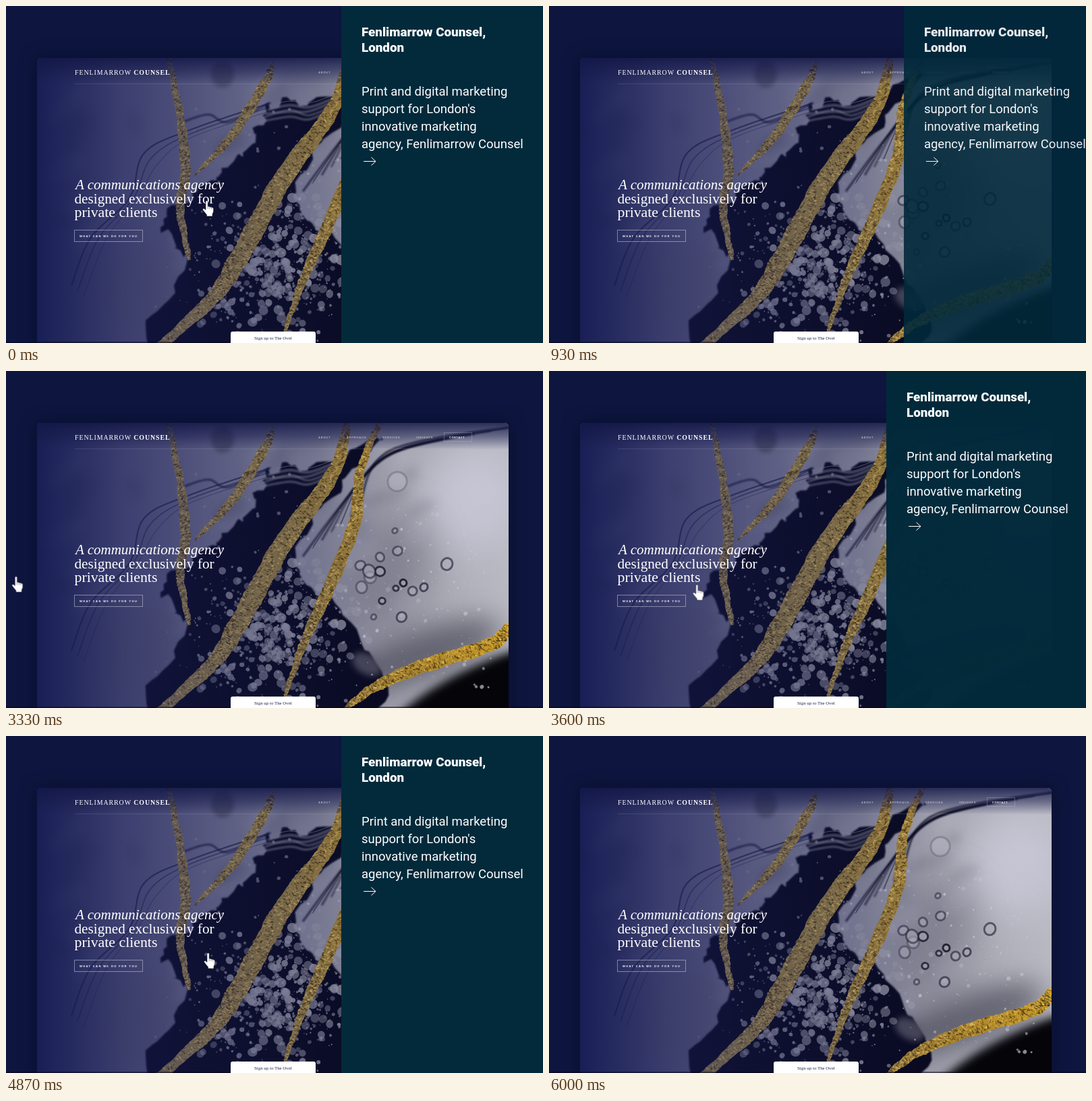
Write an HTML page with a canvas that moves like this. It is 796 px wide and 500 px high and loops after 8000 ms.

```html
<!DOCTYPE html>
<html lang="en">
<head>
<meta charset="utf-8">
<title>Agency showcase</title>
<style>
  html, body { margin: 0; width: 100%; height: 100%; overflow: hidden; background: #0e163f; }
  canvas, svg { position: absolute; left: 0; top: 0; width: 796px; height: 500px; }
  .serif { font-family: "Liberation Serif", Times, serif; fill: #fff; }
  .tiny { font: bold 4px "Liberation Sans", Arial, sans-serif; letter-spacing: .8px; fill: #fff; }
  .copy { font: 18.5px Roboto, sans-serif; fill: #fff; }
  .name { font: 800 18.8px Roboto, sans-serif; fill: #fff; }
  #panel { animation: panel 8s infinite paused; }
  #hand { animation: hand 8s infinite paused linear; }
  @keyframes panel {
    0%, 11.48% { transform: none; opacity: 1; }
    13.325%, 41.7% { transform: translateX(299px); opacity: 0; }
    45.5%, 71.64% { transform: none; opacity: 1; }
    74.98%, 100% { transform: translateX(299px); opacity: 0; }
  }
  @keyframes hand {
    0%, .83% { transform: translate(291px, 288px); animation-timing-function: ease-in; }
    10% { transform: translate(89px, 306px); }
    10.8%, 40.9% { transform: translate(-40px, 308px); }
    41.66% { transform: translate(8px, 304px); animation-timing-function: cubic-bezier(.3, .3, .5, 1); }
    48.33%, 59.9% { transform: translate(295px, 321px); }
    60.83%, 64.2% { transform: translate(293px, 321px); animation-timing-function: ease-in; }
    71.5%, 100% { transform: translate(810px, 345px); }
  }
</style>
</head>
<body>
<canvas id="art" width="796" height="500"></canvas>
<svg viewBox="0 0 796 500">
  <text class="serif" x="102" y="101.5" font-size="9.9" letter-spacing=".95">FENLIMARROW <tspan font-weight="bold">COUNSEL</tspan></text>
  <g class="tiny">
    <g opacity=".55">
      <text x="463" y="99.5">ABOUT</text>
      <text x="505" y="99.5">APPROACH</text>
      <text x="558" y="99.5">SERVICES</text>
      <text x="608" y="99.5">INSIGHTS</text>
    </g>
    <text x="657" y="99.5" style="letter-spacing:.55px">CONTACT</text>
    <text x="109" y="342.5" style="letter-spacing:1.4px">WHAT CAN WE DO FOR YOU</text>
  </g>
  <g fill="none" stroke="#c8c8d8">
    <path d="M102 115.5H690" opacity=".15"/>
    <rect x="649.5" y="91.5" width="41" height="13" opacity=".3"/>
    <rect x="101.5" y="332.5" width="101" height="17" opacity=".55"/>
  </g>
  <g class="serif" font-size="21.2">
    <text x="103" y="271.5" font-size="21" font-style="italic">A communications agency</text>
    <text x="101.5" y="292.5">designed exclusively for</text>
    <text x="101.5" y="312.5" font-size="21.8">private clients</text>
  </g>
  <rect x="333" y="483" width="126" height="30" rx="3" fill="#fff"/>
  <text class="serif" x="368" y="495" font-size="6.9" style="fill:#1a1f4d">Sign up to The Ovel</text>
  <g id="panel">
    <rect x="497" width="299" height="500" fill="#022a3b"/>
    <g class="name">
      <text x="527" y="45">Fenlimarrow Counsel,</text>
      <text x="527" y="68">London</text>
    </g>
    <g class="copy">
      <text x="527" y="133">Print and digital marketing</text>
      <text x="527" y="159">support for London's</text>
      <text x="527" y="185">innovative marketing</text>
      <text x="527" y="211">agency, Fenlimarrow Counsel</text>
    </g>
    <path d="M530 230.5H548M541.5 224.5L548 230.5L541.5 236.5" fill="none" stroke="#fff"/>
  </g>
  <g id="hand">
    <path d="M5 2C5 .6 8.2 .6 8.2 2V9L14.6 10.8C16.2 11.3 16.6 12 16.6 13.4V17L15 21V24H6.5V21.8L1 15C0 13.2 1.6 11.6 3 12.8L5 14.5Z"
      fill="#fff" stroke="#1b1b2c" stroke-width=".6"/>
    <path d="M8.2 9V13M11 10V13.4M13.8 10.8V13.8" stroke="#55556a" stroke-width=".6"/>
  </g>
</svg>
<script>
const ctx = document.getElementById('art').getContext('2d');
const X = 46, Y = 77, W = 699, H = 423;

let seed = 77;
function rnd() {
  seed = seed + 0x6D2B79F5 | 0;
  let t = Math.imul(seed ^ seed >>> 15, 1 | seed);
  t = t + Math.imul(t ^ t >>> 7, 61 | t) ^ t;
  return ((t ^ t >>> 14) >>> 0) / 4294967296;
}
const spread = a => (rnd() - .5) * 2 * a;
const gauss = () => rnd() + rnd() + rnd() - 1.5;
const grey = (v, a) => `rgba(${v},${v},${v + 16},${a})`;

// Catmull-Rom curve through a few points
function curve(pts, steps, closed) {
  const n = pts.length, out = [];
  const at = i => pts[closed ? (i + n) % n : Math.max(0, Math.min(n - 1, i))];
  for (let i = 0; i < (closed ? n : n - 1); i++) {
    for (let s = 0; s < steps; s++) {
      const u = s / steps;
      out.push([0, 1].map(k => {
        const [a, b, c, d] = [-1, 0, 1, 2].map(o => at(i + o)[k]);
        return b + .5 * u * (c - a + u * (2 * a - 5 * b + 4 * c - d + u * (3 * (b - c) + d - a)));
      }));
    }
  }
  return out;
}

function trace(pts) {
  ctx.beginPath();
  pts.forEach(p => ctx.lineTo(...p));
}

// Even colour stops along a line
function ramp(x0, y0, x1, y1, ...colors) {
  const g = ctx.createLinearGradient(x0, y0, x1, y1);
  colors.forEach((c, i) => g.addColorStop(i / (colors.length - 1), c));
  return g;
}

function soften(px, draw) {
  ctx.filter = `blur(${px}px)`;
  draw();
  ctx.filter = 'none';
}

function oval(x, y, rx, ry, turn, color) {
  ctx.fillStyle = color;
  ctx.beginPath();
  ctx.ellipse(x, y, rx, ry, turn, 0, 7);
  ctx.fill();
}

const cloud = (x, y, rx, ry, turn, color, blur) => soften(blur, () => oval(x, y, rx, ry, turn, color));
const bubble = (x, y, r, color) => oval(x, y, r, r * (.85 + rnd() * .3), rnd() * 3, color);

function strand(pts, width, color) {
  soften(width / 3, () => {
    trace(curve(pts, 14));
    ctx.strokeStyle = color;
    ctx.lineWidth = width;
    ctx.stroke();
  });
}

function paper() {
  ctx.fillStyle = ramp(X, 0, X + W, 0, '#53557c', '#62638a', '#777895', '#85869a', '#a8a8b3', '#b9b9c2');
  ctx.fillRect(X, Y, W, H);
  cloud(200, 420, 70, 80, .3, grey(88, .3), 25);
  cloud(690, 190, 75, 80, .2, grey(208, .65), 30);
  cloud(570, 300, 55, 90, .3, grey(105, .55), 28);
  cloud(620, 420, 120, 35, -.35, grey(66, .7), 20);
  for (let i = 0; i < 45; i++) {
    const v = rnd() < .5 ? 55 : 190;
    cloud(X + rnd() * W, 110 + rnd() * 290, 12 + rnd() * 30, 6 + rnd() * 14, -1 + rnd(), grey(v, .12), 7);
  }
  cloud(725, 492, 190, 62, -.42, '#040409', 7);
  cloud(321, 101, 17, 20, 0, grey(52, .5), 3);
}

function ink() {
  const edge = curve([[394, 146], [470, 140], [553, 98], [500, 165], [428, 285], [510, 370], [545, 510],
    [218, 510], [266, 385], [232, 322], [300, 262], [362, 205]], 14, true);
  const rough = edge.map(([x, y], i) => [x + 4 * Math.sin(i * .9) + spread(4), y + 4 * Math.cos(i * .7) + spread(4)]);
  soften(.8, () => {
    trace(rough);
    ctx.fillStyle = '#090a21';
    ctx.fill();
  });
  cloud(535, 435, 24, 15, .5, grey(95, .7), 5);
}

function strands() {
  // Dark curls sweeping to the upper right
  for (let i = 0; i < 7; i++) {
    strand([[440 + i * 14, 275 - i * 12], [500 + i * 8, 195 - i * 10], [560 + i * 9, 128 - i * 4], [650 + i * 25, 100 - i * 4]],
      1 + rnd() * 2.5, `rgba(14,15,38,${.3 + rnd() * .5})`);
  }
  // Pale streaks on the ink
  for (let i = 0; i < 5; i++) {
    const y = 140 + i * 6;
    strand([[392 - i * 4, y + 8], [420, y + spread(5)], [450, y + 4], [490, y - 10 - i]], 1 + rnd() * 3, grey(140, .5));
  }
  // Long loops on the left
  for (let i = 0; i < 3; i++) {
    strand([[97 + i * 9, 415 + i * 8], [125 + i * 12, 345], [183 + i * 6, 285], [205 + i * 10, 218 + i * 8],
      [275, 183 + i * 6], [395, 143 + i * 6]], 2.2 - i * .5, `rgba(26,27,66,${.65 - i * .15})`);
  }
  strand([[262, 172], [300, 161], [330, 172], [395, 142]], 3, 'rgba(24,25,60,.7)');
}

function bubbles() {
  for (let i = 0; i < 620; i++) {
    const y = 378 + gauss() * 105, x = 400 + gauss() * 120 + (378 - y) * .25;
    const r = .8 + 6.5 * rnd() ** 2.6;
    if (x + y > 610) bubble(x, y, r, grey(150, .4 + rnd() * .45));
  }
  for (let i = 0; i < 220; i++) {
    const x = 430 + rnd() * 290, y = 200 + rnd() * 270;
    bubble(x, y, .6 + 2.4 * rnd() ** 3, grey(195, .3 + rnd() * .45));
  }
  for (let i = 0; i < 40; i++) bubble(255 + rnd() * 190, 150 + rnd() * 190, .8 + 2 * rnd() ** 2, grey(145, .6));
  for (let i = 0; i < 16; i++) {
    bubble(560 + gauss() * 100, 310 + gauss() * 90, 3 + rnd() * 6, grey(175, .5));
    ctx.strokeStyle = grey(25, .3 + rnd() * .6);
    ctx.stroke();
  }
  bubble(580, 164, 14, grey(195, .3));
  ctx.strokeStyle = grey(90, .4);
  ctx.stroke();
}

// Gold leaf ribbon, widest in the middle
function vein(thin, thick, ...pts) {
  const mid = curve(pts, 40), left = [], right = [], marks = [];
  mid.forEach(([x, y], i) => {
    const a = mid[Math.max(0, i - 1)], b = mid[Math.min(mid.length - 1, i + 1)];
    const dir = Math.atan2(b[1] - a[1], b[0] - a[0]), nx = -Math.sin(dir), ny = Math.cos(dir);
    const half = (thin + (thick - thin) * Math.sin(Math.PI * i / mid.length)) / 2;
    const l = half + Math.sin(i * .31) * .7 + spread(.8), r = half + Math.sin(i * .43) * .7 + spread(.8);
    left.push([x + nx * l, y + ny * l]);
    right.unshift([x - nx * r, y - ny * r]);
    for (let k = 0; k < half * .55; k++) {
      const o = spread(half);
      marks.push([x + nx * o, y + ny * o, dir + 1.2 + spread(.9)]);
    }
  });
  ctx.save();
  trace(left.concat(right));
  ctx.fillStyle = ramp(250, 0, 740, 0, '#94814f', '#8f7a45', '#a37f30', '#c99b24');
  ctx.fill();
  ctx.clip();
  marks.forEach(([x, y, turn]) => {
    const color = rnd() < .55 ? `rgba(52,38,16,${.25 + rnd() * .45})` : `rgba(232,200,110,${.2 + rnd() * .5})`;
    oval(x, y, 1 + rnd() * 2.2, .4 + rnd() * .7, turn, color);
  });
  ctx.restore();
}

function gold() {
  vein(6, 15, [240, 70], [259, 170], [266, 250], [258, 300], [272, 378]);
  vein(2, 15, [395, 82], [385, 112], [335, 192], [279, 252]);
  vein(7, 29, [508, 60], [487, 148], [412, 254], [345, 374], [300, 440], [180, 545]);
  vein(4, 19, [566, 50], [526, 145], [517, 225], [475, 330], [443, 400], [412, 486]);
  vein(5, 21, [495, 508], [545, 470], [620, 437], [718, 406], [760, 372], [860, 330]);
}

function shade() {
  ctx.fillStyle = ramp(X, 0, 560, 0, 'rgba(20,26,82,.92)', 'rgba(24,29,86,.5)', 'rgba(26,30,86,.32)',
    'rgba(26,30,86,.18)', 'rgba(26,30,86,0)');
  ctx.fillRect(X, Y, W, H);
  ctx.fillStyle = ramp(0, Y, 0, Y + 40, 'rgba(18,22,70,.85)', 'rgba(22,26,74,.5)', 'rgba(24,28,78,0)');
  ctx.fillRect(X, Y, W, 40);
}

ctx.fillStyle = '#0e163f';
ctx.fillRect(0, 0, 796, 500);
ctx.save();
ctx.beginPath();
ctx.roundRect(X, Y, W, H + 40, 6);
ctx.shadowColor = 'rgba(4,6,30,.5)';
ctx.shadowBlur = 24;
ctx.fill();
ctx.shadowColor = 'transparent';
ctx.clip();
[paper, ink, strands, bubbles, gold, shade].forEach(draw => draw());
ctx.restore();
ctx.fillStyle = 'rgba(4,5,20,.5)';
ctx.fillRect(0, 498, 796, 2);

// Motion advances 15 times a second
const STEP = 1000 / 15, LOOP = 8000;
const parts = document.getAnimations();
const start = performance.now();
function tick() {
  const t = Math.max(0, performance.now() - start) % LOOP;
  const shown = Math.floor((t + 4) / STEP) * STEP % LOOP;
  parts.forEach(a => { a.currentTime = shown; });
  requestAnimationFrame(tick);
}
tick();
</script>
</body>
</html>
```
